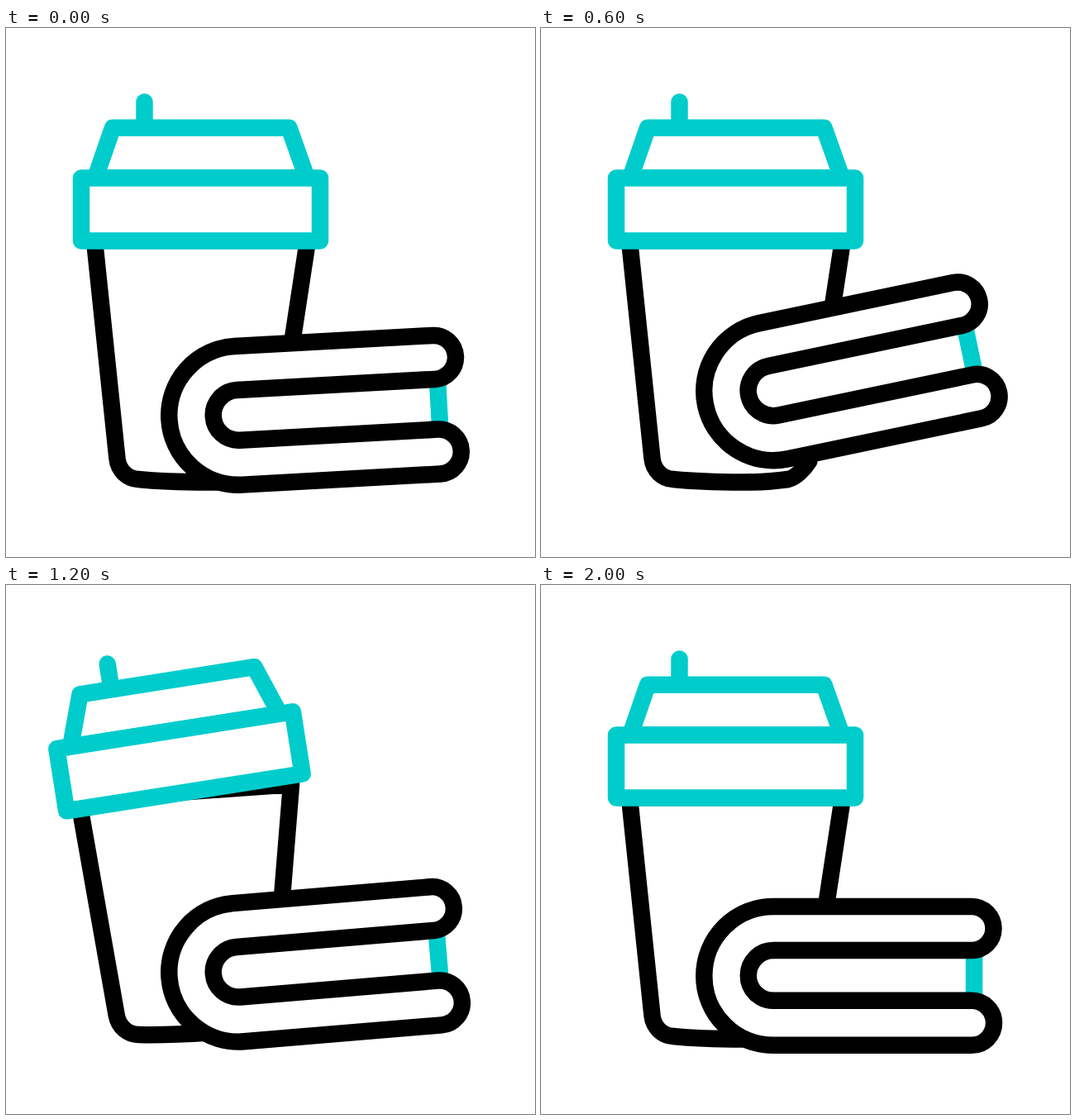
An HTML page that plays this animation: 640 px wide and 640 px high, repeating every 2320 ms.

```html
<!DOCTYPE html>
<html lang="en">
<head>
<meta charset="utf-8">
<title>Coffee and book</title>
<style>
  html, body { margin: 0; width: 100%; height: 100%; overflow: hidden; background: #fff; }
  svg { display: block; width: 100%; height: 100%; }
  path { fill: #fff; stroke: #000; stroke-width: 20.5; stroke-linejoin: round; }
  .teal { stroke: #00cccc; }
  .paper { stroke: none; }
</style>
</head>
<body>
<svg viewBox="0 0 640 640">
  <g id="cup">
    <path d="M107 257 L134.5 521 C136 535 147 545.5 160 546 C185 548.5 215 549.3 245 549.5 C268 549.5 285 548 299 546 C308 544 318 534 324.3 524 L365 257 Z"/>
    <g id="lid">
      <path class="teal" stroke-linecap="round" d="M167.5 89.5 V120"/>
      <path class="teal" d="M108 181.5 L129 120.8 H342.5 L364 181.5 Z"/>
      <path class="teal" d="M91 181.5 H380 V257.5 H91 Z"/>
    </g>
  </g>
  <g id="book">
    <path class="paper" d="M281 442 H524 V503 H281 Z"/>
    <path class="teal" d="M524 442 V503"/>
    <path d="M281.2 389 H521 A26.5 26.5 0 0 1 521 442 H281.2 A30.4 30.4 0 0 0 281.2 502.8 H521 A27 27 0 0 1 521 556.8 H281.2 A83.9 83.9 0 0 1 281.2 389 Z"/>
  </g>
</svg>
<script>
const LOOP = 2320, STEP = 40;

// Progress from 0 to 1 between times a and b.
const ramp = (t, a, b) => Math.min(1, Math.max(0, (t - a) / (b - a)));

// 0 to 1 to 0: eases up to the peak, then falls like a weight.
function hop(t, start, peak, land, lift = 1.3) {
  return t < peak
    ? Math.sin(Math.PI / 2 * ramp(t, start, peak) ** lift)
    : 1 - ramp(t, peak, land) ** 2;
}

// Sine-eased swing from one turning point [ms, angle] to the next.
function swing(t, ...turns) {
  let angle = turns[0][1];
  for (let i = 1; i < turns.length; i++) {
    const [a, from] = turns[i - 1], [b, to] = turns[i];
    angle += (to - from) * (1 - Math.cos(Math.PI * ramp(t, a, b))) / 2;
  }
  return angle;
}

function pose(id, x, y, turn, px, py) {
  document.getElementById(id).setAttribute("transform",
    `translate(${x} ${y}) rotate(${turn} ${px} ${py})`);
}

function draw(now) {
  const t = Math.floor(now % LOOP / STEP) * STEP;

  // The book leaps, and its landing bounces everything.
  const bookY = -56.6 * hop(t, -40, 390, 720) - 35.7 * hop(t, 720, 890, 1220);
  const bookTurn = -17 * hop(t, -40, 390, 770, 0.9)
    + swing(t, [720, 0], [840, 0.95], [1120, -5.4], [1480, 0]);
  pose("book", 0, bookY, bookTurn, 281.2, 473);

  const cupY = -32.7 * hop(t, 720, 890, 1210);
  const cupTurn = swing(t, [720, 0], [880, -5], [1120, -5.3], [1440, 3.2], [1720, -2.2], [2000, 0]);
  pose("cup", 0, cupY, cupTurn, 160, 532);

  // The lid exaggerates the cup's tilt and flips loose in the air.
  const flip = hop(t, 720, 850, 1140);
  const lidY = -30 * hop(t, 795, 960, 1160);
  pose("lid", 16.4 * flip, lidY, 1.2 * cupTurn + 12.8 * flip, 235.7, 257.5);
}

const start = performance.now();
function tick() {
  draw(performance.now() - start);
  requestAnimationFrame(tick);
}
tick();
</script>
</body>
</html>
```
